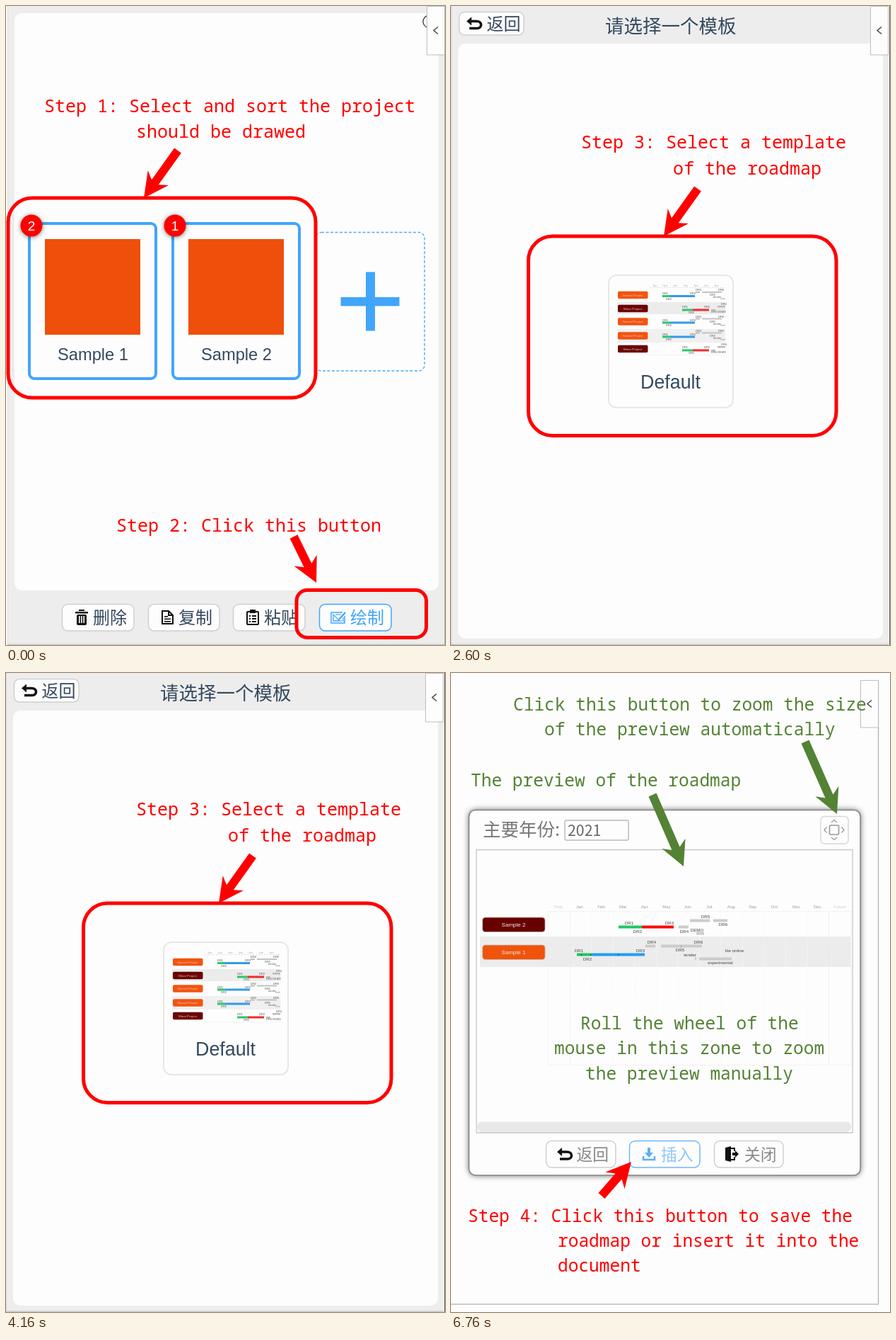
An HTML page with a canvas that plays this animation: 621x902 px, repeating every 7800 ms.

```html
<!DOCTYPE html>
<html lang="en">
<head>
<meta charset="utf-8">
<title>Roadmap steps</title>
<style>
html, body { margin: 0; width: 100%; height: 100%; overflow: hidden; background: #fff; }
canvas { display: block; }
</style>
</head>
<body>
<canvas id="stage" width="621" height="902"></canvas>
<script>
const ctx = document.getElementById('stage').getContext('2d');
const SCENE_MS = 2600;
const RED = '#ff0000', GREEN = '#548235', BLUE = '#41a5fc', INK = '#34495e', PAPER = '#fdfdfd';
const SANS = '"Liberation Sans", Arial, sans-serif';
const CJK = '"Noto Sans CJK SC", "Noto Sans CJK", sans-serif';
const MONO = '"Noto Sans Mono", monospace';

function rect(x, y, w, h, color) {
  ctx.fillStyle = color;
  ctx.fillRect(x, y, w, h);
}

// Rounded box given by its opposite corners
function box(x1, y1, x2, y2, r, fill, stroke, width = 1) {
  ctx.beginPath();
  ctx.roundRect(x1, y1, x2 - x1, y2 - y1, r);
  if (fill) { ctx.fillStyle = fill; ctx.fill(); }
  if (stroke) { ctx.strokeStyle = stroke; ctx.lineWidth = width; ctx.stroke(); }
}

function line(points, color, width = 1, close = false) {
  ctx.beginPath();
  points.forEach(([x, y]) => ctx.lineTo(x, y));
  if (close) ctx.closePath();
  ctx.strokeStyle = color;
  ctx.lineWidth = width;
  ctx.stroke();
}

function shape(points, color) {
  ctx.beginPath();
  points.forEach(([x, y]) => ctx.lineTo(x, y));
  ctx.fillStyle = color;
  ctx.fill();
}

function text(str, x, y, size, color, family = SANS, align = 'left') {
  const weight = family === CJK ? 300 : 400;
  ctx.font = `${weight} ${size}px ${family}`;
  ctx.textAlign = align;
  ctx.fillStyle = color;
  ctx.fillText(str, x, y);
}

// Annotation text, sized so that one character advances by `pitch`
function note(str, x, y, color, pitch = 15) {
  ctx.font = `100px ${MONO}`;
  text(str, x, y, pitch * 100 / ctx.measureText('0').width, color, MONO);
}

function arrow(tailX, tailY, tipX, tipY, color, shaft = 6, head = 35, wing = 18) {
  ctx.save();
  ctx.translate(tipX, tipY);
  ctx.rotate(Math.atan2(tipY - tailY, tipX - tailX));
  const len = Math.hypot(tipX - tailX, tipY - tailY), neck = head * 0.78;
  shape([[0, 0], [-head, -wing], [-neck, -shaft], [-len, -shaft],
    [-len, shaft], [-neck, shaft], [-head, wing]], color);
  ctx.restore();
}

function sideTab(x, y, h) {
  box(x + .5, y + .5, x + 25.5, y + h, 0, PAPER, '#bdbdbd');
  const cx = x + 13, cy = y + h / 2;
  line([[cx + 3, cy - 5], [cx - 3, cy], [cx + 3, cy + 5]], '#444', 1.5);
}

const icons = {
  trash(c) {
    rect(-9, -8, 18, 2.5, c); rect(-4, -11, 8, 2, c);
    box(-7, -4, 7, 11, 2, c);
    for (const x of [-4, -0.8, 2.4]) rect(x, -2, 1.6, 10, PAPER);
  },
  copy(c) {
    line([[-7, -9], [2, -9], [8, -3], [8, 9], [-7, 9]], c, 2, true);
    line([[2, -9], [2, -3], [8, -3]], c, 2);
    for (const y of [-2, 1.5, 5]) rect(-4, y, y < 0 ? 5 : 9, 1.6, c);
  },
  paste(c) {
    box(-8, -8, 8, 10, 1, null, c, 2);
    rect(-4, -11, 8, 5, c);
    for (const y of [-3, 1, 5]) { rect(-5, y, 2, 2, c); rect(-1, y, 6, 2, c); }
  },
  draw(c) {
    line([[6, -7], [-10, -7], [-10, 8], [9, 8], [9, -2]], c, 1.5);
    line([[-7, 5], [-7, -4], [2, 5]], c, 1.3, true);
    line([[1, 3], [10, -7]], c, 2.4);
    line([[-4, -4], [4, -4]], c, 1.2);
    line([[3, 5], [7, 5], [7, 0]], c, 1.2);
  },
  back(c) {
    shape([[-11, -3], [-4, -9], [-4, 3]], c);
    ctx.beginPath();
    ctx.moveTo(-6, -3); ctx.lineTo(3, -3);
    ctx.bezierCurveTo(12, -3, 11, 7, 4, 7);
    ctx.lineTo(-7, 7);
    ctx.strokeStyle = c; ctx.lineWidth = 3.6; ctx.stroke();
  },
  save(c) {
    rect(-2, -9, 4, 8, c);
    shape([[-6, -2], [6, -2], [0, 5]], c);
    line([[-8, 3], [-8, 8], [8, 8], [8, 3]], c, 2.5);
  },
  exit(c) {
    shape([[-9, -9], [-1, -11], [-1, 11], [-9, 9]], c);
    line([[-1, -8], [4, -8], [4, -4]], c, 2);
    line([[-1, 8], [4, 8], [4, 4]], c, 2);
    rect(1, -2, 6, 4, c);
    shape([[5, -5], [10, 0], [5, 5]], c);
  }
};

function button(x1, y1, x2, y2, icon, label, iconX, textX, size, color = INK, border = '#cfcfcf', iconColor = '#111') {
  box(x1 + .5, y1 + .5, x2, y2, 8, PAPER, border, 1.5);
  ctx.save();
  ctx.translate(iconX, (y1 + y2) / 2);
  icons[icon](iconColor);
  ctx.restore();
  text(label, textX, (y1 + y2) / 2 + size * .38, size, color, CJK);
}

function sampleCard(x, label, order) {
  box(x, 307, x + 179, 526, 7, PAPER, BLUE, 4);
  rect(x + 22, 329, 135, 135, '#ee4f0b');
  text(label, x + 90, 500, 23.7, INK, SANS, 'center');
  ctx.save();
  ctx.shadowColor = 'rgba(0,0,0,.5)';
  ctx.shadowBlur = 6;
  ctx.shadowOffsetY = 1;
  box(x - 12.5, 294.5, x + 18.5, 325.5, 15.5, RED);
  ctx.restore();
  text(order, x + 3, 317, 19, '#fff', SANS, 'center');
}

function selectScene() {
  rect(2, 0, 619, 902, '#ededed');
  rect(2, 0, 1, 902, '#dcdcdc');
  rect(2, 900.5, 619, 1.5, '#c9c9c9');
  rect(620, 0, 1, 902, '#b5b5b5');
  box(12, 10, 612, 825, 10, PAPER);
  ctx.beginPath();
  ctx.arc(599, 22, 9, 2, 4.28);
  ctx.strokeStyle = '#333'; ctx.lineWidth = 1.3; ctx.stroke();
  sideTab(595, 0, 69);

  ctx.setLineDash([4, 2.5]);
  box(438, 319.5, 592, 515, 8, null, '#4eacf5', 1.4);
  ctx.setLineDash([]);
  rect(473.5, 411, 83, 12.5, BLUE);
  rect(509, 375.5, 13, 83, BLUE);
  sampleCard(33, 'Sample 1', '2');
  sampleCard(236, 'Sample 2', '1');

  button(79, 844, 181, 882, 'trash', '删除', 107, 123, 24);
  button(201, 844, 302, 882, 'copy', '复制', 228, 244, 24);
  button(321, 844, 423, 882, 'paste', '粘贴', 349, 365, 24);
  button(443, 844, 545, 882, 'draw', '绘制', 470, 487, 24, BLUE, BLUE, BLUE);

  box(3, 271, 438, 553, 34, null, RED, 5);
  box(411, 824.5, 594.5, 891.5, 15, null, RED, 5);
  note('Step 1: Select and sort the project', 54, 150, RED);
  note('should be drawed', 184, 186, RED);
  arrow(243, 204, 195, 271, RED);
  note('Step 2: Click this button', 156, 742, RED);
  arrow(407, 749, 439, 814, RED);
}

function thumbnail() {
  rect(235, 418, 153, 17, '#ececec');
  rect(235, 456, 153, 19, '#f0f0f0');
  ctx.setLineDash([2, 2]);
  line([[281, 397.5], [388, 397.5]], '#e3ddcf');
  line([[281, 492.5], [388, 492.5]], '#ece8de');
  ctx.setLineDash([]);
  for (let i = 0; i < 7; i++) text('Jan', 285 + i * 14.5, 396, 4, '#aaa');
  [408, 427, 445.5, 465.5, 484].forEach((y, i) => {
    const dark = i === 1 || i === 4;
    box(236, y - 5.2, 278.5, y + 5.2, 2, dark ? '#6b0505' : '#f25410');
    text(dark ? 'Minor Project' : 'Normal Project', 257, y + 1.5, 4.4, '#e8c5b5', SANS, 'center');
    const x = dark ? 327 : 299, green = dark ? 15 : 11, barY = y + (dark ? .5 : 0);
    rect(x, barY, green, 3, '#28c76c');
    rect(x + green, barY, dark ? 23 : 35, 3, dark ? '#f02d2d' : '#3599ea');
    const tag = (str, tagX, tagY) => text(str, tagX, y + tagY, 4, '#555');
    tag('DR1', x, -.8);
    tag('DR2', x + (dark ? 9 : 5), 6.5);
    tag('DR3', x + (dark ? 31 : 39), -.8);
    if (dark) {
      rect(368, y + 1, 6, 2.5, '#bbb');
      rect(377, y - 4, 11, 2.5, '#bbb');
      tag('DR4', 382, -5);
      tag('DR4 DEMO', 368, 6);
    } else {
      rect(346, y - 5, 6, 2, '#bbb');
      rect(355, y - 5, 28, 2, '#c2c2c2');
      rect(381, y + 4.5, 7, 1.5, '#c2c2c2');
      tag('DR4', 346, -6);
      tag('DR6', 378, -6);
      tag('DR5', 366, 1);
      tag('tender', 371, 4);
    }
  });
}

function templateScene() {
  rect(0, 0, 621, 902, '#ededed');
  rect(0, 0, 1, 902, '#d8d8d8');
  rect(0, 900.5, 621, 1.5, '#c9c9c9');
  rect(619, 0, 1, 902, '#fff');
  rect(620, 0, 1, 902, '#555');
  box(10, 53, 611, 893, 10, PAPER);
  button(11, 8, 103, 41, 'back', '返回', 33, 50.5, 24);
  text('请选择一个模板', 218, 38, 26.5, INK, CJK);
  sideTab(593, 0, 69);

  box(223, 380, 399, 567, 11, PAPER, '#eae7e2', 2);
  thumbnail();
  text('Default', 310.5, 540, 26.8, INK, SANS, 'center');

  box(109.5, 325, 545, 606.5, 34, null, RED, 5);
  note('Step 3: Select a template', 184, 201, RED);
  note('of the roadmap', 314, 238, RED);
  arrow(349, 258, 301, 325, RED);
}

function roadmap() {
  const months = 'Past Jan. Feb. Mar. Apr. May Jun. Jul. Aug. Sep. Oct. Nov. Dec. Future'.split(' ');
  months.forEach((m, i) => text(m, 152 + i * 30.6, 332, 6, i % 13 ? '#999' : '#ccc', SANS, 'center'));
  rect(41, 372, 524, 43, '#ececec');
  ctx.setLineDash([2, 1.5]);
  box(137.5, 336.5, 565.5, 553.5, 0, null, '#eeeade');
  for (let i = 0; i < 13; i++) {
    const x = 168.5 + i * 30.5;
    line([[x, 337], [x, 553]], i % 12 ? '#f7f7f4' : '#e9e6d8');
  }
  ctx.setLineDash([]);

  const pill = (y, color, label) => {
    box(44.5, y, 133, y + 20.5, 4, color, '#c9b8b0', .8);
    text(label, 88.5, y + 13, 8, '#eee', SANS, 'center');
  };
  pill(345, '#680000', 'Sample 2');
  pill(384, '#f0540c', 'Sample 1');

  const bar = (x1, x2, y, color = '#cbcbcb') => rect(x1, y, x2 - x1, 4, color);
  const tag = (str, x, y) => text(str, x, y, 6.2, '#444', SANS, 'center');
  bar(237, 270, 356.5, '#20c565');
  bar(270, 315, 356.5, '#ff0808');
  bar(322, 336, 356.5);
  bar(338, 366, 347.5);
  bar(347, 358, 365.5);
  bar(371, 391, 347.5);
  tag('DR1', 252, 355); tag('DR2', 264, 367); tag('DR3', 309, 355);
  tag('DR4', 330, 367); tag('DEMO', 348, 365); tag('DR5', 360, 346); tag('DR6', 385, 357);

  bar(178, 200, 395.5, '#20c565');
  bar(200, 274, 395.5, '#249cf5');
  bar(275, 289, 383.5);
  bar(297, 355, 383.5);
  bar(351, 397, 401.5);
  rect(325, 384, 1.2, 4, '#8bbf9c');
  rect(345.5, 401, 1, 4, '#aaa');
  for (const x of [184, 197, 236]) rect(x, 397, 1.5, 1.5, '#155');
  tag('DR1', 181, 394); tag('DR2', 193, 406); tag('DR3', 268, 394); tag('DR4', 284, 382);
  tag('DR5', 324, 393); tag('DR6', 350, 382); tag('tender', 338, 400);
  tag('lite online', 401, 394); tag('experimental', 381, 411);
}

function fitIcon(cx, cy) {
  const c = '#999';
  box(cx - 6.5, cy - 6.5, cx + 6.5, cy + 6.5, 1, null, c, 1.6);
  for (let i = 0; i < 4; i++) {
    ctx.save();
    ctx.translate(cx, cy);
    ctx.rotate(i * Math.PI / 2);
    line([[-4, -10.5], [0, -14], [4, -10.5]], c, 1.3);
    ctx.restore();
  }
}

function previewScene() {
  rect(0, 0, 621, 902, PAPER);
  line([[604.5, 10], [604.5, 891]], '#bbb', 1.5);
  line([[0, 891], [605, 891]], '#bbb', 1.5);
  sideTab(579, 10, 67);

  ctx.save();
  ctx.shadowColor = 'rgba(0,0,0,.65)';
  ctx.shadowBlur = 8;
  box(25.5, 193.5, 579, 709, 9, PAPER);
  ctx.restore();
  box(25.5, 193.5, 579, 709, 9, null, '#858585', 1.5);

  text('主要年份:', 45, 230, 25.5, '#777', CJK);
  box(161, 208, 251, 236, 2, PAPER, '#bbb', 1.5);
  text('2021', 165, 230, 21.3, '#666', CJK);
  box(523, 202.5, 562, 241, 5, PAPER, '#d8d8d8', 1.5);
  fitIcon(542, 221.5);

  box(36, 249.5, 568, 649, 0, PAPER, '#c8c8c8', 1.3);
  roadmap();
  box(37, 633.5, 566, 648, 7, '#e8e8e8');
  button(134, 660, 233, 698, 'back', '返回', 161, 177.5, 22.8, '#888');
  button(252, 660, 352, 698, 'save', '插入', 280, 297, 22.8, '#8fc5fb', '#6db9fa', '#5aaefa');
  button(372, 660, 470, 698, 'exit', '关闭', 397, 415, 22.8, '#888');

  const pitch = 14.7;
  note('Click this button to zoom the size', 88, 53, GREEN, pitch);
  note('of the preview automatically', 132, 88, GREEN, pitch);
  note('The preview of the roadmap', 28, 160, GREEN, pitch);
  note('Roll the wheel of the', 183, 503, GREEN, pitch);
  note('mouse in this zone to zoom', 146, 538, GREEN, pitch);
  note('the preview manually', 190, 574, GREEN, pitch);
  arrow(501, 97, 546, 199, GREEN);
  arrow(285, 172, 329, 273, GREEN);
  note('Step 4: Click this button to save the', 24, 775, RED, pitch);
  note('roadmap or insert it into the', 151, 810, RED, pitch);
  note('document', 151, 845, RED, pitch);
  arrow(213, 738, 255, 690, RED);
}

const scenes = [selectScene, templateScene, previewScene];
const start = performance.now();

function frame() {
  const elapsed = Math.max(0, performance.now() - start);
  rect(0, 0, 621, 902, '#fff');
  scenes[Math.floor(elapsed / SCENE_MS) % scenes.length]();
  requestAnimationFrame(frame);
}
frame();
</script>
</body>
</html>
```
